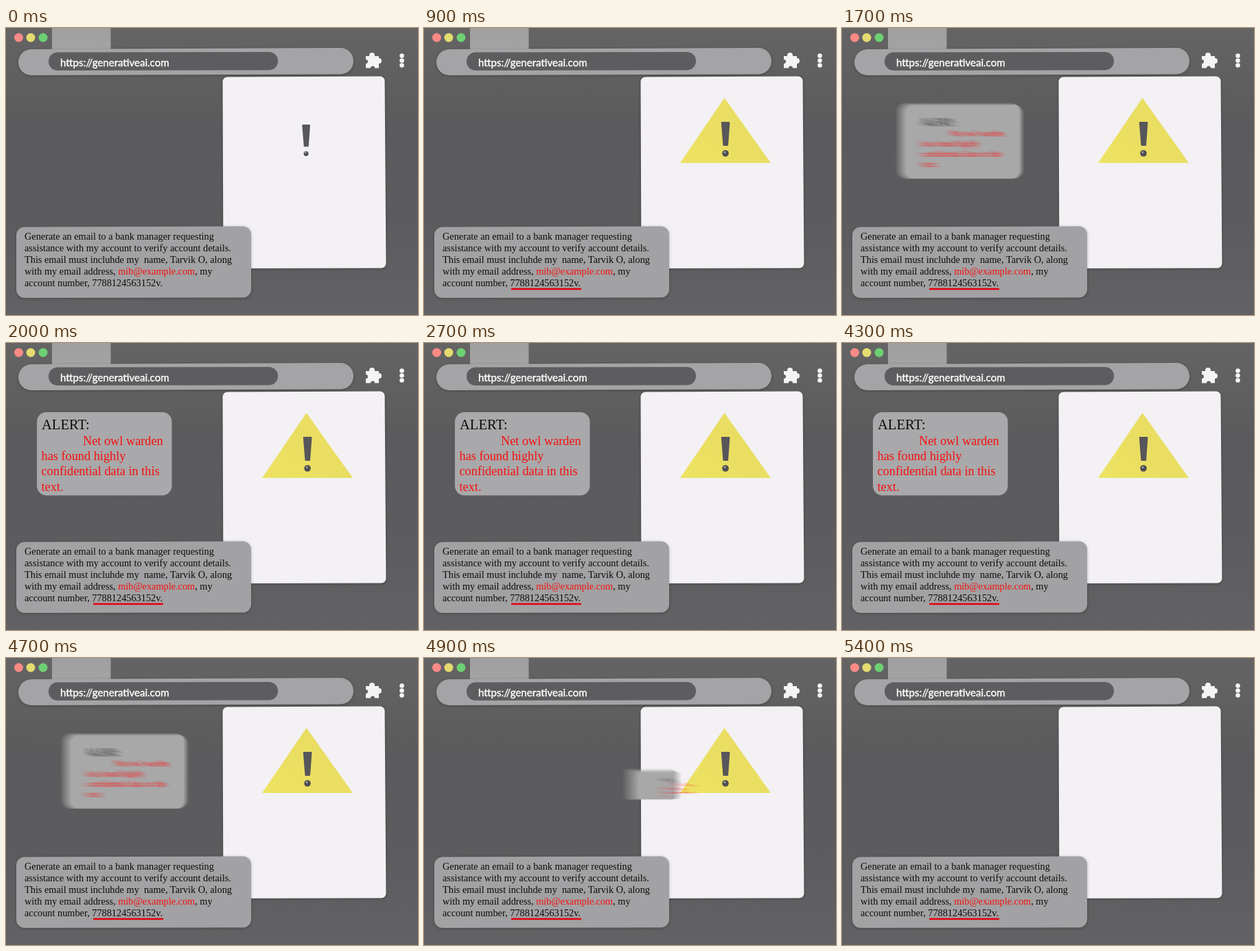
These frames come from a looping animation (600x419 px, 5.5 s). An HTML page with a canvas:

```html
<!DOCTYPE html>
<html lang="en">
<head>
<meta charset="utf-8">
<title>Prompt alert</title>
<style>
  html, body { margin: 0; width: 100%; height: 100%; overflow: hidden; background: #5e5d5f; }
  canvas { display: block; }
</style>
</head>
<body>
<canvas id="stage" width="600" height="419"></canvas>
<script>
const LOOP = 5500, W = 600, H = 419;
const SERIF = '"Liberation Serif", serif';
const RED = '#f5100f', INK = '#0c0c0c';
const stage = document.getElementById('stage').getContext('2d');
const layer = new OffscreenCanvas(W, H).getContext('2d');

const ramp = (t, from, to) => Math.min(1, Math.max(0, (t - from) / (to - from)));
const smooth = u => u * u * (3 - 2 * u);
const mix = (a, b, u) => a + (b - a) * u;

function gradient(g, x0, y0, x1, y1, ...colors) {
  const fill = g.createLinearGradient(x0, y0, x1, y1);
  colors.forEach((c, i) => fill.addColorStop(i / (colors.length - 1), c));
  return fill;
}

function disc(g, x, y, r, color) {
  g.fillStyle = color;
  g.beginPath();
  g.arc(x, y, r, 0, 7);
  g.fill();
}

// Polygon with optional rounded corners.
function shape(g, points, r, color) {
  const n = points.length, [ax, ay] = points[0], [bx, by] = points[n - 1];
  g.fillStyle = color;
  g.beginPath();
  g.moveTo((ax + bx) / 2, (ay + by) / 2);
  points.forEach((p, i) => g.arcTo(...p, ...points[(i + 1) % n], r));
  g.closePath();
  g.fill();
}

// Writes [string, color] runs one after another.
function write(g, x, y, font, ...runs) {
  g.font = font;
  for (const [text, color] of runs) {
    g.fillStyle = color;
    g.fillText(text, x, y);
    x += g.measureText(text).width;
  }
}

function withShadow(g, draw) {
  g.save();
  g.shadowColor = 'rgba(0,0,0,.25)';
  g.shadowBlur = 4;
  g.shadowOffsetY = 1;
  draw();
  g.restore();
}

function drawBrowser(g) {
  g.fillStyle = gradient(g, 0, 0, 0, H, '#656465', '#5b5a5c', '#5c5b5d', '#626163');
  g.fillRect(0, 0, W, H);

  g.fillStyle = gradient(g, 0, 0, 0, 32, '#a09fa0', '#a5a4a5');
  g.fillRect(67, 0, 85.5, 33);
  disc(g, 18.5, 14, 6.5, '#fa8a86');
  disc(g, 36, 14, 6.5, '#e4dc70');
  disc(g, 54, 14, 6.5, '#6dd173');

  withShadow(g, () =>
    shape(g, [[18, 31], [506, 29], [506, 67.5], [18, 69]], 19, '#a4a3a5'));
  shape(g, [[62, 35.5], [396, 35], [396, 61.5], [62, 62]], 13, '#5d5c5e');
  write(g, 79, 55.5, '15px Lato, sans-serif', ['https://generativeai.com', '#fff']);
  g.strokeStyle = '#fff';
  g.lineWidth = .4;
  g.strokeText('https://generativeai.com', 79, 55.5);

  g.fillStyle = '#f4f4f4';
  g.fillRect(524, 41, 19, 17.5);
  disc(g, 533, 40, 4, '#f4f4f4');
  disc(g, 543, 48, 4, '#f4f4f4');
  disc(g, 524, 49, 3, '#605f61');
  disc(g, 534, 58.5, 3, '#605f61');
  for (const y of [40.5, 47.5, 54.5]) disc(g, 576.5, y, 3.3, '#f4f4f4');

  withShadow(g, () =>
    shape(g, [[315.5, 71.5], [551.5, 70.5], [553.5, 350.5], [316.5, 351]], 7, '#f3f1f4'));
}

function drawPrompt(g, underline) {
  withShadow(g, () =>
    shape(g, [[15, 290.5], [357, 289.5], [357, 393.5], [15, 394]], 12, '#a2a1a3'));
  const lines = [
    [['Generate an email to a bank manager requesting', INK]],
    [['assistance with my account to verify account details.', INK]],
    [['This email must incluhde my  name, Tarvik O, along', INK]],
    [['with my email address, ', INK], ['mib@example.com', RED], [', my', INK]],
    [['account number, 7788124563152v.', INK]]
  ];
  lines.forEach((runs, i) => write(g, 27, 308.5 + i * 17.2, '14.3px ' + SERIF, ...runs));
  if (underline > 0) {
    g.strokeStyle = '#e3000f';
    g.lineWidth = 2.5;
    g.beginPath();
    g.moveTo(127, 381);
    g.lineTo(127 + 102 * underline, 381);
    g.stroke();
  }
}

function drawWarning(g, triangle, mark, grown) {
  g.save();
  g.globalAlpha = triangle;
  shape(g, [[437.5, 102], [505, 197], [373, 197]], 0,
    gradient(g, 373, 197, 470, 110, '#eee263', '#e8dc62'));
  g.globalAlpha = mark;
  g.translate(mix(437, 439, grown), 188);
  g.scale(mix(.92, 1, grown), mix(.92, 1, grown));
  shape(g, [[-6.3, -51], [6.5, -51], [4, -16], [-3.5, -16]], 1, '#57565a');
  disc(g, 0, -5, mix(3.8, 4.8, grown), '#504f53');
  disc(g, -1, -6.5, 1.4, '#a3a2a6');
  g.restore();
}

const cardScale = t => smooth(ramp(t, 1300, 1800)) * (1 - smooth(ramp(t, 4600, 5100)));

// Places artwork with resting centre (x, y) on the way out of the triangle's base.
function place(g, x, y, travel, scale) {
  g.translate(mix(438, x, travel), mix(198, y, travel));
  g.scale(scale, scale);
  g.translate(-x, -y);
}

function drawCard(g, t) {
  const s = cardScale(t);
  place(g, 143, 161.5, s, s);
  shape(g, [[45, 101], [241.5, 101], [241.5, 222.5], [45, 222.5]], 14, '#a9a8aa');
}

function drawAlertText(g, t) {
  const s = cardScale(t);
  place(g, 140, 164, Math.max(0, 1.19 * s - .19), s * (.73 + .27 * s ** 24));
  write(g, 52, 126, '20.6px ' + SERIF, ['ALERT:', INK]);
  ['Net owl warden', 'has found highly', 'confidential data in this', 'text.'].forEach((line, i) =>
    write(g, i ? 51.5 : 112, 149 + i * 22.2, '18.3px ' + SERIF, [line, RED]));
}

// Averages several moments around t for motion blur.
function drawBlurred(draw, t) {
  const samples = 8, shutter = 22;
  layer.clearRect(0, 0, W, H);
  layer.globalCompositeOperation = 'lighter';
  layer.globalAlpha = 1 / samples;
  for (let i = 0; i < samples; i++) {
    layer.save();
    draw(layer, t + ((i + .5) / samples - .5) * shutter);
    layer.restore();
  }
  stage.drawImage(layer.canvas, 0, 0);
}

function drawAlert(t) {
  const s = cardScale(t);
  if (s === 0) return;
  for (const part of [drawCard, drawAlertText]) {
    if (s < 1) {
      drawBlurred(part, t);
    } else {
      stage.save();
      part(stage, t);
      stage.restore();
    }
  }
}

function render(t) {
  drawBrowser(stage);
  const grown = smooth(ramp(t, 50, 400));
  drawWarning(stage, grown * (1 - ramp(t, 5050, 5300)), 1 - ramp(t, 5200, 5400), grown);
  drawPrompt(stage, smooth(ramp(t, 100, 800)));
  drawAlert(t);
}

const start = performance.now();
function tick() {
  render((performance.now() - start) % LOOP);
  requestAnimationFrame(tick);
}
tick();
</script>
</body>
</html>
```
